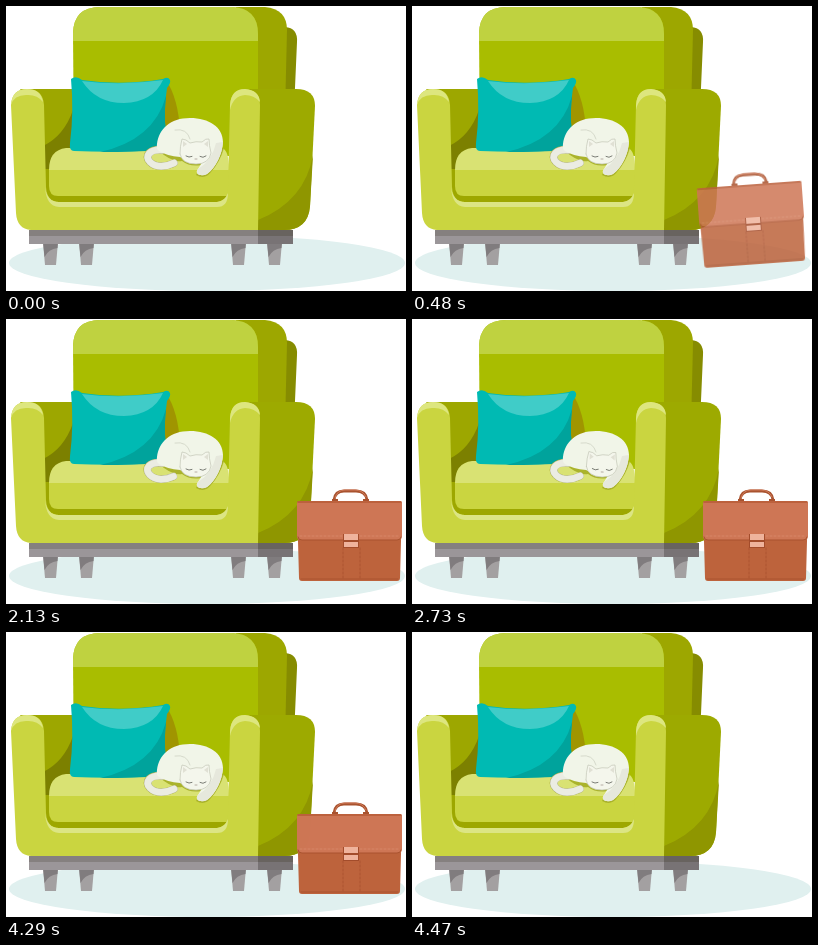
An HTML page with a canvas for the animation above (4.5 s loop, 400 by 285 pixels).

```html
<!DOCTYPE html>
<html lang="en">
<head>
<meta charset="utf-8">
<title>Cat on an armchair</title>
<style>
html, body { margin: 0; width: 100%; height: 100%; overflow: hidden; background: #fff; }
canvas { display: block; width: 400px; height: 285px; }
</style>
</head>
<body>
<canvas id="stage" width="400" height="285"></canvas>
<script>
const ctx = document.getElementById('stage').getContext('2d');
const LOOP = 4500;
const clamp = v => Math.max(0, Math.min(1, v));
const span = (t, from, to) => clamp((t - from) / (to - from));
const easeOut = p => 1 - (1 - p) ** 3;
const bump = p => (1 - Math.cos(2 * Math.PI * p)) / 2;

function fill(path, color) {
  ctx.fillStyle = color;
  ctx.fill(new Path2D(path));
}

function line(path, color, width = 1, dash = []) {
  ctx.strokeStyle = color;
  ctx.lineWidth = width;
  ctx.lineCap = 'round';
  ctx.lineJoin = 'round';
  ctx.setLineDash(dash);
  ctx.stroke(new Path2D(path));
}

function ellipse(x, y, rx, ry, color) {
  ctx.fillStyle = color;
  ctx.beginPath();
  ctx.ellipse(x, y, rx, ry, 0, 0, 2 * Math.PI);
  ctx.fill();
}

function rotate(target, x, y, degrees) {
  target.translate(x, y);
  target.rotate(degrees * Math.PI / 180);
  target.translate(-x, -y);
}

function rotated(x, y, degrees, draw) {
  ctx.save();
  rotate(ctx, x, y, degrees);
  draw();
  ctx.restore();
}

function drawBase() {
  ellipse(201, 257, 198, 28, '#e0f0ef');
  for (const x of [37, 73, 225, 261]) {
    fill(`M${x} 236h15l-2 23h-11z`, '#a3a0a1');
    fill(`M${x} 236h15l-.5 6q-9 1-13 9z`, '#807c7e');
  }
  fill('M23 224H287V238H23z', '#9b9699');
  fill('M23 224H287V230H23z', '#85807f');
  fill('M252 224H287V238H252z', '#787375');
  fill('M252 224H287V230H252z', '#68635f');
}

function drawBack() {
  fill('M260 21H279Q292 22 291 36L286 150H250z', '#868c00');
  fill('M230 1H259Q281 3 281 24L278 150H240z', '#9da700');
  fill('M67 27Q68 1 94 1H226Q252 2 252 28V150H68z', '#a9bd00');
  fill('M67 27Q68 1 94 1H226Q252 2 252 28V35H67z', '#bfd240');
}

function drawSeat() {
  fill('M14 83H67V138L39 198L34 110z', '#9da700');
  fill('M67 104Q58 130 37 140V196H67z', '#7c8000');
  fill('M160 74Q172 92 174 124L170 142H151z', '#a09500');
  fill('M38 163H224V198H38z', '#9da700');
  fill('M43 163H224V190H52Q43 190 43 180z', '#cad540');
  fill('M43 164Q43 144 60 142H216Q223 144 223 164z', '#d9e273');
}

function drawPillow() {
  const shape = 'M65 73Q70 69 76 74Q115 80 157 73Q162 70 164 74Q165 77 161 82Q156 112 162 140Q161 146 154 144Q110 147 68 145Q63 145 64 137Q68 106 65 73z';
  fill(shape, '#00bab3');
  fill('M76 75Q115 80 157 74Q147 96 118 97Q90 97 76 75z', '#40ccc8');
  fill('M160 90Q148 134 94 146Q130 146 154 144Q161 146 162 140Q157 116 160 90z', '#00a39c');
}

function drawArms() {
  fill('M239 83H290Q309 83 309 100L304 200Q302 224 278 224H252z', '#9daa00');
  fill('M307 149Q299 195 252 214V224H278Q302 224 304 200z', '#8f9600');
  fill('M5 99Q6 83 21 83Q37 83 38 99L40 181Q41 196 53 196H211Q222 195 222 181L224 99Q225 83 239 83Q254 84 254 99L252 224H25Q11 223 10 207z', '#cad540');
  fill('M5 99Q6 83 21 83Q35 83 37 96Q31 88 20 89Q8 89 5 99z', '#dde67f');
  fill('M224 99Q225 83 239 83Q253 84 254 96Q248 89 239 89Q227 90 224 104z', '#dde67f');
  fill('M39 181Q41 196 53 196H211Q219 195 222 187Q222 201 211 201H53Q40 200 39 181z', '#dce584');
}

function drawTail() {
  const curl = 'M156 144C144 143 138 150 144 156C150 162 160 161 168 157';
  rotated(156, 142, 2, () => line(curl, '#aeb03c', 7.5));
  line(curl, '#c5c6b4', 7.4);
  line(curl, '#ebece2', 6.6);
}

function drawHead() {
  fill('M174 148Q174 140 176 133Q180 133 184 137Q190 135 196 136Q200 132 203 133Q203 139 205 147Q203 158 190 158Q176 158 174 148z', '#f4f6ec');
  line('M174 148Q174 140 176 133Q180 133 184 137Q190 135 196 136Q200 132 203 133Q203 139 205 147Q203 158 190 158Q176 158 174 148', '#c3c6b6', 0.7);
  fill('M177 135L181 138L177 141z', '#e0e0d4');
  fill('M202 135L198 138L202 141z', '#e0e0d4');
  line('M180 150Q183 152 186 150.5M194 150.5Q197 152.5 200 150', '#6e7069', 0.9);
  line('M189 153H191', '#a59a92', 0.8);
}

function drawCat(t) {
  fill('M152 144Q166 157 176 155Q184 161 195 159L190 169Q199 174 205 166Q214 156 218 142z', '#aab32c');
  const swing = t < 3000 ? span(t, 1500, 2580) * 2 : span(t, 3750, 4290);
  rotated(155, 143, 8 * bump(swing), drawTail);
  fill('M151 138C153 123 164 112 184 112C203 112 217 121 217 136C216 149 210 161 201 168C195 171 188 168 192 163L198 153Q184 157 174 151Q161 150 153 145Q150 143 151 138z', '#f1f5e8');
  fill('M217 136C216 149 210 161 201 168C195 171 188 168 192 163Q206 155 210 137z', '#e6e8dc');
  line('M169 124Q181 122 184 133', '#cfd2c3', 0.8);
  rotated(190, 158, 4 * bump(span(t, 2580, 3180)), drawHead);
}

function drawCase() {
  line('M328 181Q329 172 338 172H350Q360 172 361 181', '#a9532f', 2.8);
  line('M329 179Q331 171 339 171H349Q357 171 360 178', '#d07b5a', 1);
  fill('M326 180H332V184H326zM357 180H363V184H357z', '#a9532f');
  fill('M294 182H393Q396 182 396 185L394 259Q394 262 391 262H296Q293 262 293 259L291 185Q291 182 294 182z', '#bd633c');
  fill('M294 182H393Q396 182 396 185V217Q396 221 392 221H295Q291 221 291 217V185Q291 182 294 182z', '#ce7655');
  line('M292 218Q292 221 296 221H391Q395 221 395 218', '#a9532f', 1);
  line('M292 183H395', '#b65b36', 1.4);
  line('M294 217H393', '#dc9074', 0.6, [2, 2]);
  line('M337 229V260M354 229V260', '#a9522f', 0.8, [2, 2]);
  line('M295 260H392', '#a9522f', 1);
  fill('M337 215H353V229H337z', '#a34c2b');
  fill('M338 215H352V221H338zM338 223H352V228H338z', '#efb39c');
}

function drawBriefcase(t) {
  const arrival = easeOut(span(t, 30, 990));
  const opacity = arrival * (1 - span(t, 4290, 4470));
  if (opacity <= 0) return;
  // A separate layer lets overlapping pieces fade as one object.
  layer.clearRect(0, 0, 400, 285);
  layer.save();
  rotate(layer, 293, 269, -28 * (1 - arrival));
  layer.drawImage(caseArt, 0, 0);
  layer.restore();
  ctx.globalAlpha = opacity;
  ctx.drawImage(layer.canvas, 0, 0);
  ctx.globalAlpha = 1;
}

function makeCanvas() {
  const canvas = document.createElement('canvas');
  canvas.width = 400;
  canvas.height = 285;
  return canvas;
}

const layer = makeCanvas().getContext('2d');
const caseArt = makeCanvas();
drawCase();
caseArt.getContext('2d').drawImage(ctx.canvas, 0, 0);

function render(now) {
  const t = now % LOOP;
  ctx.fillStyle = '#fff';
  ctx.fillRect(0, 0, 400, 285);
  drawBase();
  drawBack();
  drawSeat();
  drawPillow();
  drawArms();
  drawCat(t);
  drawBriefcase(t);
}

const start = performance.now();
function tick() {
  render(performance.now() - start);
  requestAnimationFrame(tick);
}
tick();
</script>
</body>
</html>
```
